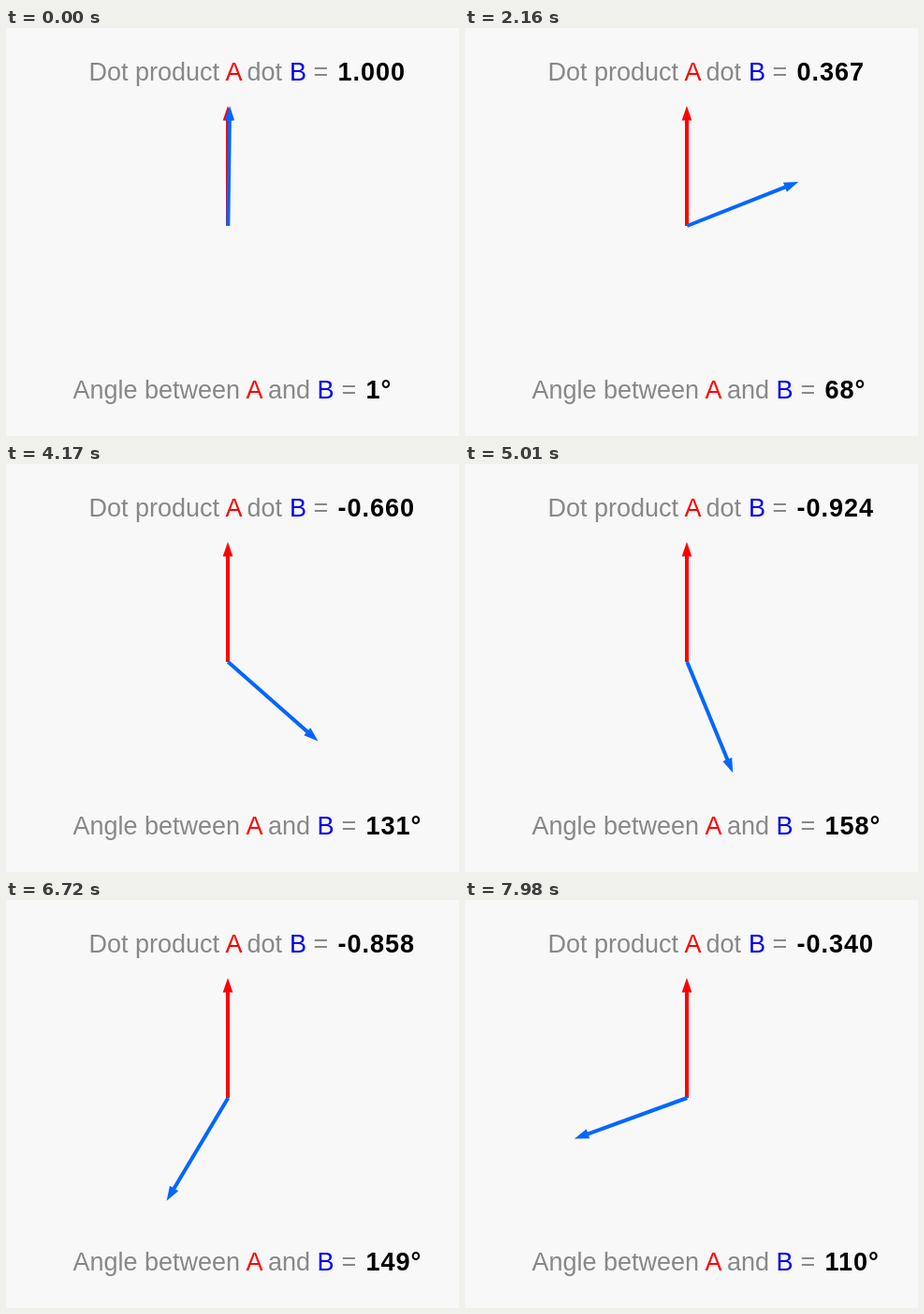
Recreate the animation shown at these times as an HTML page. Size 484 by 435 pixels, loop 8 s.

```html
<!DOCTYPE html>
<html lang="en">
<head>
<meta charset="utf-8">
<title>Dot product</title>
<style>
  html, body { margin: 0; width: 100%; height: 100%; overflow: hidden; background: #f8f8f8; }
  svg { display: block; }
  text { font: 27px "Liberation Sans", Arial, sans-serif; fill: #888; white-space: pre; }
  .a { fill: #f00; }
  .b { fill: #00e; }
  .value { font-weight: bold; letter-spacing: 1px; fill: #000; }
</style>
</head>
<body>
<svg width="484" height="435" viewBox="0 0 484 435">
  <defs>
    <g id="arrow">
      <path d="M-2 0V-114H2V0Z"/>
      <path d="M0 -128L5.3 -112.5H-5.3Z"/>
    </g>
  </defs>
  <use href="#arrow" fill="#f00" transform="translate(237 211)"/>
  <use id="vecB" href="#arrow" fill="#06f"/>
  <g transform="translate(0 56)">
    <text x="88.5">Dot product</text>
    <text x="234.5" class="a">A</text>
    <text x="257.5">dot</text>
    <text x="303" class="b">B</text>
    <text x="328.5">=</text>
    <text x="354.5" class="value" id="dot"></text>
  </g>
  <g transform="translate(0 394.5)">
    <text x="71.5">Angle between</text>
    <text x="256.5" class="a">A</text>
    <text x="280">and</text>
    <text x="332.5" class="b">B</text>
    <text x="358.5">=</text>
    <text x="384.5" class="value" id="angle"></text>
  </g>
</svg>
<script>
const LOOP = 8000, STEP = 30;
const get = id => document.getElementById(id);
const vecB = get("vecB"), dot = get("dot"), angle = get("angle");

// Nearly steady turn that slows very slightly towards the end.
const turn = n => 0.9375 * n + 1.01 - 1.4e-5 * (n - 128) ** 2;

function draw(ms) {
  const deg = turn(Math.floor((ms % LOOP) / STEP));
  vecB.setAttribute("transform", `translate(237.3 211) rotate(${deg})`);
  dot.textContent = Math.cos(deg * Math.PI / 180).toFixed(3);
  angle.textContent = Math.round(deg > 180 ? 360 - deg : deg) + "°";
}

const start = performance.now();
function tick() {
  draw(performance.now() - start);
  requestAnimationFrame(tick);
}
draw(0);
requestAnimationFrame(tick);
</script>
</body>
</html>
```
